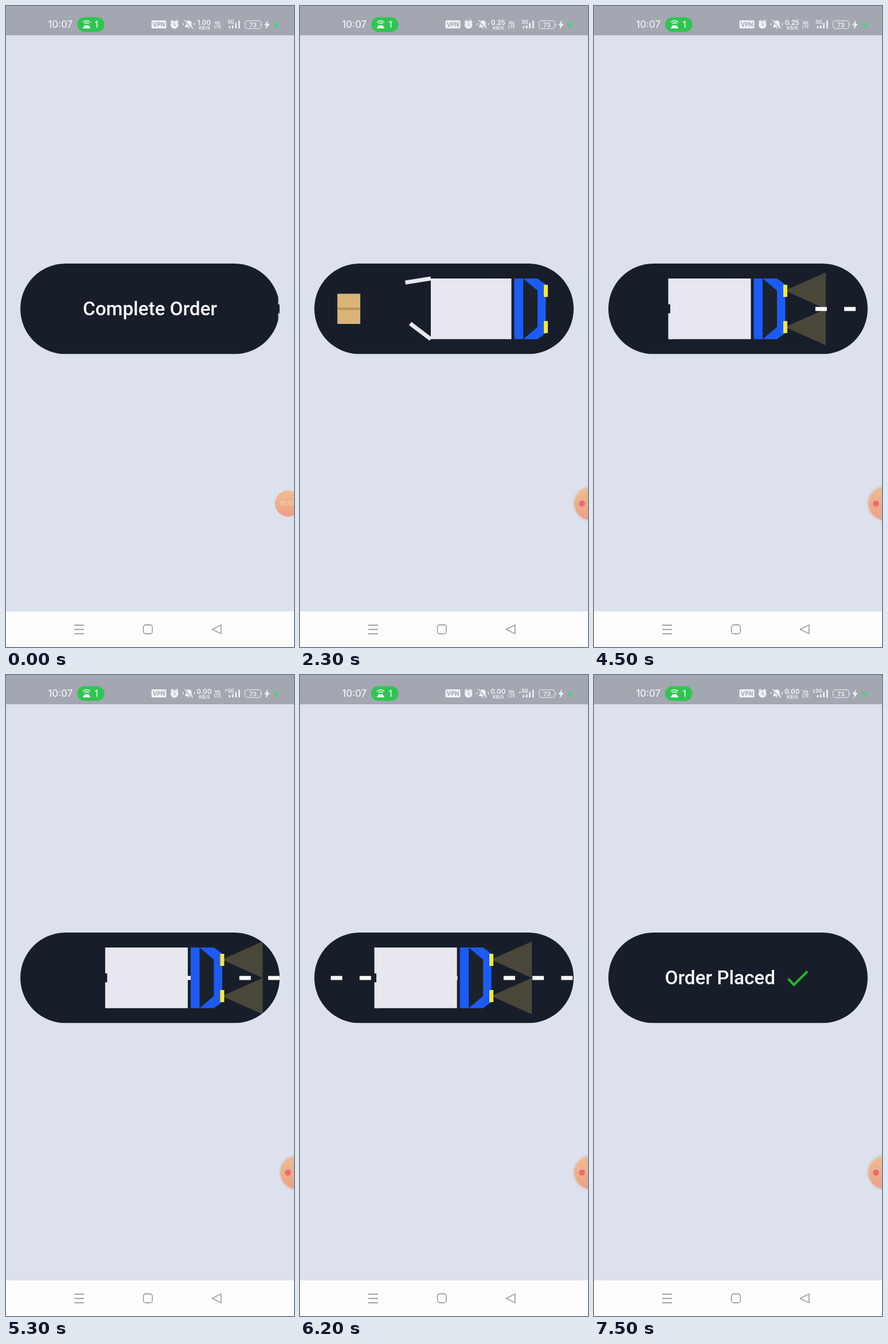
An HTML page that plays this animation: 502x1115 px, repeating every 8000 ms.

```html
<!DOCTYPE html>
<html lang="en">
<head>
<meta charset="utf-8">
<title>Order button</title>
<style>
  html, body { margin: 0; width: 100%; height: 100%; overflow: hidden; background: #dce1ed; }
  svg { display: block; width: 502px; height: 1115px; }
  .label { font: 500 33.2px Roboto, sans-serif; fill: #fdfdff; text-anchor: middle; }
  .status { font-family: Inter, Roboto, sans-serif; font-weight: 700; fill: #f0f1f4; text-anchor: middle; }
  .nav { fill: none; stroke: #85868c; stroke-width: 1.3; stroke-linejoin: round; }
</style>
</head>
<body>
<svg viewBox="0 0 502 1115">
  <defs>
    <clipPath id="pill"><rect x="25" y="448" width="452" height="157.5" rx="78.75"/></clipPath>
    <linearGradient id="peach" x1="0" y1="0" x2="0" y2="1">
      <stop offset="0" stop-color="#efbd90"/><stop offset="1" stop-color="#ef9f83"/>
    </linearGradient>
  </defs>
  <rect width="502" height="1115" fill="#dce1ed"/>
  <rect width="502" height="51" fill="#a3a7b1"/>
  <rect y="1053" width="502" height="62" fill="#fefdfe"/>

  <!-- status bar -->
  <g class="status">
    <text x="94.7" y="38.2" font-size="16.8" font-weight="500">10:07</text>
    <rect x="124" y="19.5" width="47.5" height="25.5" rx="12.7" fill="#2fc551"/>
    <path d="M137 33.5h7l3.5 5.5h-14z"/>
    <path d="M134 28.500q6.500-6 13 0M136.500 31q4-3.600 8 0" fill="none" stroke="#f0f1f4" stroke-width="1.6"/>
    <text x="157.500" y="37.800" font-size="15.500" font-weight="500">1</text>
    <rect x="253.500" y="25" width="26" height="14" rx="2"/>
    <text x="266.500" y="35.800" font-size="10" fill="#a3a7b1">VPN</text>
    <circle cx="293.600" cy="32.800" r="6.800"/>
    <path d="M287 28l4-3.500M300.200 28l-4-3.500" stroke="#f0f1f4" stroke-width="2"/>
    <path d="M293.600 29v4.200l3 1.600" fill="none" stroke="#a3a7b1" stroke-width="1.300"/>
    <path d="M312 37v-1.500l1.500-2v-3.500q0-4.500 5-5q5 .5 5 5v3.500l1.500 2v1.500zM316.500 38h4q-2 3-4 0z"/>
    <path d="M311 25.500l14.500 14" stroke="#a3a7b1" stroke-width="3"/>
    <path d="M311 24.500l15 15M308.700 29.500v4M328.300 29.500v4" stroke="#f0f1f4" stroke-width="1.400"/>
    <text id="speed" x="345.300" y="33" font-size="11.300"></text>
    <text x="345.800" y="41" font-size="8">KB/S</text>
    <text x="368.500" y="31.500" font-size="8">Vo</text>
    <text x="368.800" y="39" font-size="7">LTE</text>
    <path id="up" d="M381 27.500l2.300-2.800l2.300 2.800z"/>
    <path id="down" d="M381 29l2.300 2.800l2.300-2.800z"/>
    <text x="392" y="31" font-size="8.500">5G</text>
    <path d="M388.500 35h2.700v4h-2.700zM393.800 33.500h2.700v5.500h-2.700zM399.300 29.500h2.700v9.500h-2.700zM405 25.500h2.700v13.500h-2.700z"/>
    <rect x="416.700" y="25.700" width="27.600" height="13.600" rx="4" fill="none" stroke="#e3e5e9" stroke-width="1.300"/>
    <path d="M445.500 30.500q2 2 0 4z"/>
    <text x="430.500" y="36.500" font-size="11" font-weight="600">73</text>
    <path d="M457 24.500l-7 9h4l-1.500 7l7.500-9.500h-4.500z"/>
    <circle cx="471.300" cy="33" r="4" fill="#5ccb83"/>
  </g>

  <!-- button -->
  <g clip-path="url(#pill)">
    <rect x="25" y="448" width="452" height="157.500" fill="#181e29"/>
    <g id="box">
      <rect y="500.500" width="40" height="52.500" fill="#dab579"/>
      <rect y="524.700" width="40" height="4" fill="#b49457"/>
    </g>
    <path id="beams" d="M200 495L271 463.500V527zM200 558.500L271 527V590z" fill="#48473a"/>
    <g id="dashes" fill="#fdfcfd"></g>
    <g id="truck">
      <rect id="door1" x="-3.500" y="474" width="7" height="45" fill="#e7e8ee"/>
      <rect id="door2" x="-3.500" y="534.500" width="7" height="45" fill="#e7e8ee"/>
      <rect y="474" width="140.500" height="105.500" fill="#e7e7ef"/>
      <path d="M145.500 474H186L200.500 484.500V569L186 579.500H145.500z" fill="#1c5cf5"/>
      <path d="M161 474L186 495V558.500L161 579.500z" fill="#1b222c"/>
      <path d="M197 485h7v21h-7zM197 548h7v21h-7z" fill="#fee83a"/>
    </g>
    <text id="before" class="label" x="251" y="538.300">Complete Order</text>
    <g id="after">
      <text class="label" x="219.700" y="538.300">Order Placed</text>
      <path d="M338.500 528.500L348.500 539L372 515.500" fill="none" stroke="#22b52b" stroke-width="4.300"/>
    </g>
  </g>

  <!-- recorder bubble -->
  <g id="timer">
    <circle cx="491.500" cy="865.500" r="23.500" fill="#dfd4d0"/>
    <circle cx="491.500" cy="865.500" r="22.500" fill="url(#peach)"/>
    <text x="478" y="869" font-family="Roboto, sans-serif" font-size="10" fill="#f6d5c0">00:05</text>
  </g>
  <g id="recorder">
    <circle cx="507" cy="865.500" r="32" fill="#dad5d5"/>
    <circle cx="507" cy="865.500" r="28.800" fill="url(#peach)"/>
    <circle cx="491.500" cy="865.500" r="5.300" fill="#ea6b74"/>
  </g>

  <!-- navigation -->
  <g class="nav">
    <path d="M119 1077h17M119 1084.500h17M119 1092h17"/>
    <rect x="239.500" y="1076.500" width="15.500" height="15.500" rx="4"/>
    <path d="M359.500 1084.300L374.800 1076.500V1092z"/>
  </g>
</svg>
<script>
  const LOOP = 8000, STEP = 100;
  const $ = id => document.getElementById(id);

  // [time, value] tables, linear between rows
  const tracks = {
    truck: [[1050, 478], [2790, 130], [3550, 184], [4400, 127.5], [5330, 178], [6260, 130], [7080, 486]],
    box: [[1110, -15], [2700, 92], [3200, 168], [3300, 176]],
    door1: [[1760, 0], [2360, 90], [2950, 90], [3764, 0]],
    door2: [[1947, 0], [2547, 90], [2860, 90], [3673, 0]],
    beams: [[4100, 0], [4400, 1]],
    lines: [[4095, 477], [7100, -199]],
    lineFade: [[6700, 1], [7050, 0]],
    label: [[500, 1], [800, 0]]
  };

  function at(name, t) {
    const rows = tracks[name];
    if (t <= rows[0][0]) return rows[0][1];
    for (let i = 1; i < rows.length; i++) {
      const [t0, a] = rows[i - 1], [t1, b] = rows[i];
      if (t < t1) return a + (b - a) * (t - t0) / (t1 - t0);
    }
    return rows[rows.length - 1][1];
  }

  const set = (id, name, value) => $(id).setAttribute(name, value);
  const show = (id, on) => set(id, "opacity", on ? 1 : 0);
  const moveX = (id, x) => set(id, "transform", `translate(${x.toFixed(2)} 0)`);

  for (let i = 0; i < 15; i++) {
    const dash = document.createElementNS("http://www.w3.org/2000/svg", "rect");
    Object.entries({ x: i * 50.2, y: 523.5, width: 20, height: 7 })
      .forEach(([k, v]) => dash.setAttribute(k, v));
    $("dashes").append(dash);
  }

  function draw(t) {
    const x = at("truck", t);
    moveX("truck", x);
    moveX("beams", x);
    moveX("box", at("box", t));
    moveX("dashes", at("lines", t));
    set("door1", "transform", `rotate(${at("door1", t)} 0 474)`);
    set("door2", "transform", `rotate(${-at("door2", t)} 0 579.5)`);
    set("beams", "opacity", at("beams", t));
    set("dashes", "opacity", at("lineFade", t));
    set("before", "opacity", at("label", t));
    show("box", t < 3300);
    show("after", t >= 7500);
    show("timer", t < 600);
    show("recorder", t >= 600);
    $("speed").textContent = t < 1000 ? "1.00" : t < 4700 ? "0.25" : "0.00";
    show("up", (t >= 4700 && t < 5700) || t >= 6600);
    show("down", t >= 5700);
  }

  const start = performance.now();
  function tick() {
    const t = (performance.now() - start) % LOOP;
    draw(Math.floor(t / STEP) * STEP);
    requestAnimationFrame(tick);
  }
  tick();
</script>
</body>
</html>
```
